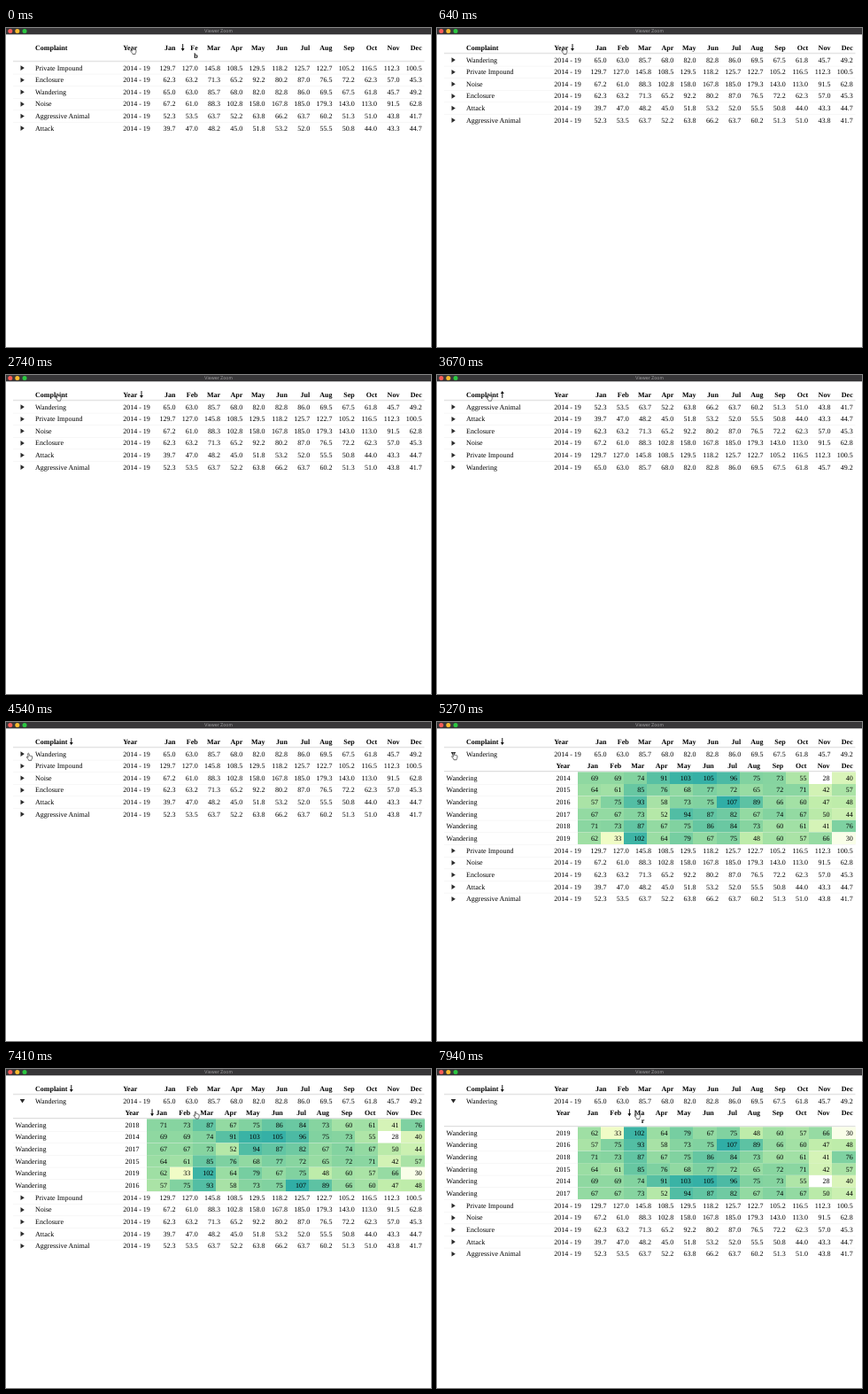
These frames come from a looping animation (480x360 px, 8000 ms). An HTML page:

```html
<!DOCTYPE html>
<html lang="en">
<head>
<meta charset="utf-8">
<title>Viewer Zoom</title>
<style>
  html, body { margin: 0; height: 100%; overflow: hidden; background: #fff; }
  svg { display: block; width: 100vw; height: 100vh; }
  text { font: 8px "Liberation Serif", serif; text-rendering: geometricPrecision; }
  .head { font-weight: bold; }
  .right { text-anchor: end; }
  .title { font: 5.1px Inter, sans-serif; fill: #a3a2a4; text-anchor: middle; }
</style>
</head>
<body>
<svg id="stage" viewBox="0 0 480 360">
  <rect width="480" height="7.3" fill="#373638"/>
  <circle cx="4.8" cy="3.5" r="2.5" fill="#fc5b57"/>
  <circle cx="12.8" cy="3.5" r="2.5" fill="#fdbc2e"/>
  <circle cx="21" cy="3.5" r="2.5" fill="#2ac840"/>
  <text class="title" x="240" y="5.4">Viewer Zoom</text>
</svg>
<script>
const LOOP = 8000, PITCH = 13.6, HEAD = 14.1, LINE = 9;
const EXPAND_AT = 4770, EXPANDED = 'Wandering', DETAIL_HEIGHT = 95.6;
const months = 'Jan Feb Mar Apr May Jun Jul Aug Sep Oct Nov Dec'.split(' ');

const yearly = {
  2014: [69, 69, 74, 91, 103, 105, 96, 75, 73, 55, 28, 40],
  2015: [64, 61, 85, 76, 68, 77, 72, 65, 72, 71, 42, 57],
  2016: [57, 75, 93, 58, 73, 75, 107, 89, 66, 60, 47, 48],
  2017: [67, 67, 73, 52, 94, 87, 82, 67, 74, 67, 50, 44],
  2018: [71, 73, 87, 67, 75, 86, 84, 73, 60, 61, 41, 76],
  2019: [62, 33, 102, 64, 79, 67, 75, 48, 60, 57, 66, 30]
};
const years = Object.values(yearly);
const average = {
  'Aggressive Animal': [52.3, 53.5, 63.7, 52.2, 63.8, 66.2, 63.7, 60.2, 51.3, 51, 43.8, 41.7],
  'Attack': [39.7, 47, 48.2, 45, 51.8, 53.2, 52, 55.5, 50.8, 44, 43.3, 44.7],
  'Enclosure': [62.3, 63.2, 71.3, 65.2, 92.2, 80.2, 87, 76.5, 72.2, 62.3, 57, 45.3],
  'Noise': [67.2, 61, 88.3, 102.8, 158, 167.8, 185, 179.3, 143, 113, 91.5, 62.8],
  'Private Impound': [129.7, 127, 145.8, 108.5, 129.5, 118.2, 125.7, 122.7, 105.2, 116.5, 112.3, 100.5],
  'Wandering': months.map((_, m) => years.reduce((sum, y) => sum + y[m], 0) / years.length)
};

// Sort clicks: time, column, direction
const mainSorts = [
  [0, 'Feb', -1], [70, 'Year', -1], [1610, 'Year', 1], [2070, 'Year', -1],
  [2970, 'Complaint', -1], [3470, 'Complaint', 1], [3870, 'Complaint', -1]
];
const detailSorts = [[0, '', 1], [6870, 'Jan', -1], [7740, 'Mar', -1]];

// Pointer stops: time, x, y
const pointerPath = [
  [0, 144, 25.3], [2070, 144, 25.3], [2740, 59.3, 25], [3870, 59.3, 25],
  [4570, 26.5, 39.2], [4770, 25, 39], [5000, 20, 38.5], [5600, 20, 38.5],
  [6600, 184, 50.7], [7000, 184, 50.7], [7620, 226.5, 52.3], [LOOP, 226.5, 52.3]
];

const stage = document.getElementById('stage');
const clamp = v => Math.min(1, Math.max(0, v));
const mix = (a, b, k) => a + (b - a) * k;
const move = (node, x, y, extra = '') => node.setAttribute('transform', `translate(${x} ${y}) ${extra}`);

function add(parent, tag, attrs = {}, text = '') {
  const node = document.createElementNS('http://www.w3.org/2000/svg', tag);
  for (const key in attrs) node.setAttribute(key, attrs[key]);
  node.textContent = text;
  parent.append(node);
  return node;
}

// Heat scale with quadratically spaced stops
const heatStops = [[255, 255, 255], [240, 252, 198], [191, 236, 170], [135, 213, 160], [48, 174, 166]];
function heat(value) {
  const p = Math.sqrt((value - 28) / (107 - 28)) * 4;
  const i = Math.min(3, Math.floor(p));
  const k = (p * p - i * i) / (2 * i + 1);
  return `rgb(${heatStops[i].map((c, n) => Math.round(mix(c, heatStops[i + 1][n], k)))})`;
}

// Columns: { name, x, right }; rows: { key, cells }
function makeTable(columns, rows, decorate) {
  const root = add(stage, 'g');
  const heads = columns.map(({ name, x, right }) => {
    const attrs = { x, class: right ? 'head right' : 'head' };
    return {
      name, right,
      arrowX: right ? x - 17 : x + { Complaint: 40.8, Year: 20.8 }[name],
      label: add(root, 'text', { ...attrs, y: 9.5 }, name),
      tail: add(root, 'text', { ...attrs, y: 9.5 + LINE })
    };
  });
  const arrow = add(root, 'path', { d: 'M0-4L1.9-1H.45V4H-.45V-1H-1.9Z' });
  const lines = rows.map((row, index) => {
    const group = add(root, 'g');
    add(group, 'rect', { x: 8, y: 0, width: 464.5, height: .5, fill: '#eee' });
    const extra = decorate(group, row);
    columns.forEach(({ x, right }, c) => {
      const value = row.cells[c];
      add(group, 'text', { x, y: 9.4, class: right ? 'right' : '' }, row.format(value));
    });
    return { ...row, index, group, extra };
  });
  const rule = add(root, 'rect', { x: 8, width: 464.5, height: 1, fill: '#dedede' });

  function update(t, sorts, gapAfter) {
    const [, name, dir] = sorts.filter(s => s[0] <= t).pop();
    const col = columns.findIndex(c => c.name === name);
    const compare = (a, b) => {
      const u = a.cells[col], v = b.cells[col];
      return dir * ((u > v) - (u < v) || a.index - b.index);
    };
    let wrap = 0;
    arrow.style.display = col < 0 ? 'none' : '';
    heads.forEach((head, i) => {
      // Only the narrowest month fits beside the arrow
      const split = i === col && head.right && head.name !== 'Jan';
      head.label.textContent = split ? head.name.slice(0, 2) : head.name;
      head.tail.textContent = split ? head.name.slice(2) : '';
      if (split) wrap = LINE;
      if (i === col) move(arrow, head.arrowX, 6.9, dir < 0 ? 'rotate(180)' : '');
    });
    rule.setAttribute('y', HEAD - 1.4 + wrap);
    let y = HEAD + wrap;
    for (const line of [...lines].sort(compare)) {
      move(line.group, 0, y);
      y += PITCH + (line.key === EXPANDED ? gapAfter : 0);
    }
    return wrap;
  }
  return { root, lines, update };
}

const monthColumns = pitch => months.map((name, m) => ({ name, x: 469.7 - (11 - m) * pitch, right: true }));

const main = makeTable(
  [{ name: 'Complaint', x: 33 }, { name: 'Year', x: 132.2 }, ...monthColumns(25.3)],
  Object.entries(average).map(([key, values]) => ({
    key,
    cells: [key, '2014 - 19', ...values],
    format: v => typeof v === 'number' ? v.toFixed(1) : v
  })),
  group => add(group, 'path', { d: 'M-2-2.8L2.3 0L-2 2.8Z', fill: '#2b2b2b' })
);

const CELL = 26.15;
const detail = makeTable(
  [{ name: 'Year', x: 134.4 }, ...monthColumns(CELL)],
  Object.entries(yearly).map(([key, values]) => ({ key, cells: [key, ...values], format: String })),
  (group, row) => {
    row.cells.slice(1).forEach((value, m) => {
      const x = Math.round(472.5 - (12 - m) * CELL);
      const end = Math.round(472.5 - (11 - m) * CELL);
      add(group, 'rect', { x, y: 0, width: end - x, height: PITCH, fill: heat(value) });
    });
    add(group, 'text', { x: 10.5, y: 9.4 }, EXPANDED);
  }
);

const pointer = add(stage, 'path', {
  d: 'M-2-3.5q.7-.9 1.3 0L-.3-1q.8-.6 1.1.1q.8-.5 1.1.2q.9-.3 1 .5V1.8q-.2 1-.8 1.6V4.2H-1L-1.2 3.4L-3.3.7q-.2-.9.7-.6L-1.6.8Z',
  fill: '#fff', stroke: '#222', 'stroke-width': .65, 'stroke-linejoin': 'round'
});

function render(t) {
  const open = t >= EXPAND_AT;
  const detailWrap = detail.update(t, detailSorts, 0);
  const mainWrap = main.update(t, mainSorts, open ? DETAIL_HEIGHT + detailWrap : 0);
  move(main.root, 0, 15.1);
  move(detail.root, 0, 42.3 + mainWrap);
  detail.root.style.display = open ? '' : 'none';

  const turn = 90 * (1 - (1 - clamp((t - EXPAND_AT) / 250)) ** 3);
  for (const { key, extra } of main.lines) {
    move(extra, 18.5, 6.9, key === EXPANDED ? `rotate(${turn})` : '');
  }

  const next = pointerPath.findIndex(p => p[0] > t);
  const [t0, x0, y0] = pointerPath[next - 1], [t1, x1, y1] = pointerPath[next];
  const k = (t - t0) / (t1 - t0), eased = k * k * (3 - 2 * k);
  move(pointer, mix(x0, x1, eased), mix(y0, y1, eased));
}

const start = performance.now();
function tick() {
  render((performance.now() - start) % LOOP);
  requestAnimationFrame(tick);
}
tick();
</script>
</body>
</html>
```
